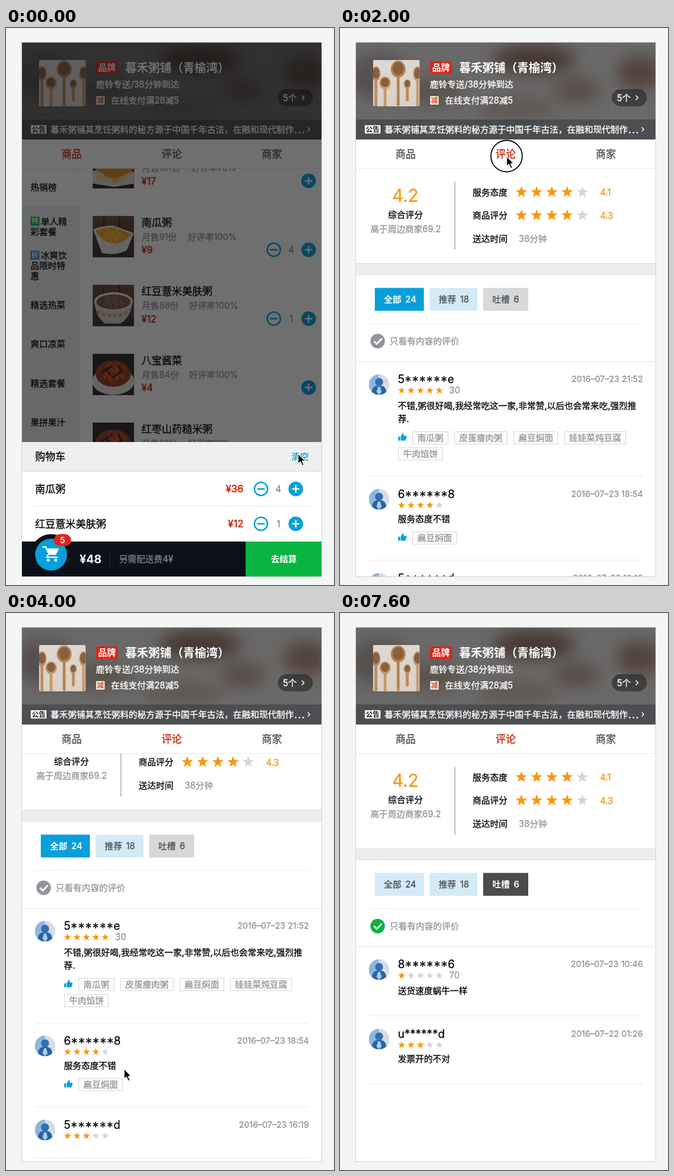
Write an HTML page that moves like this. It is 575 px wide and 974 px high and loops after 8000 ms.

```html
<!DOCTYPE html>
<html lang="zh-CN">
<head>
<meta charset="utf-8">
<title>Ordering page</title>
<style>
html, body { margin: 0; width: 100%; height: 100%; overflow: hidden; background: #f4f6f6; }
svg { display: block; width: 575px; height: 974px; }
text { font-family: Inter, "Noto Sans CJK SC", "Noto Sans CJK", sans-serif; white-space: pre; stroke-width: .35px; }
</style>
</head>
<body>
<svg id="stage" viewBox="0 0 575 974" xmlns="http://www.w3.org/2000/svg">
  <defs>
    <clipPath id="page"><rect x="28" y="25" width="525.5" height="934"/></clipPath>
    <clipPath id="body"><rect x="28" y="246" width="525.5" height="713"/></clipPath>
    <clipPath id="banner"><rect x="28" y="25" width="525.5" height="170"/></clipPath>
    <clipPath id="photo"><rect width="72.4" height="72.4"/></clipPath>
    <clipPath id="shop"><rect x="58" y="56" width="81.5" height="81" rx="2"/></clipPath>
    <clipPath id="face"><circle r="18"/></clipPath>
    <filter id="blur" x="-50%" y="-50%" width="200%" height="200%"><feGaussianBlur stdDeviation="14"/></filter>
    <linearGradient id="wood" x2="0" y2="1"><stop stop-color="#6b4a33"/><stop offset="1" stop-color="#33302f"/></linearGradient>
    <linearGradient id="wall" x2="0" y2="1"><stop stop-color="#dcd8d4"/><stop offset="1" stop-color="#dbd0c5"/></linearGradient>
  </defs>
  <rect width="575" height="974" fill="#f4f6f6"/>
  <rect x="28" y="25" width="525.5" height="934" fill="#fff"/>
  <g clip-path="url(#page)">
    <g id="view" clip-path="url(#body)"></g>
    <g id="head"></g>
    <g id="tabs"></g>
    <g id="cart"></g>
  </g>
  <rect x="27.5" y="25" width="526" height="934.5" fill="none" stroke="#cfd1d1"/>
  <g id="pointer"></g>
</svg>
<script>
const $ = id => document.getElementById(id);
const BLUE = '#079fdb', RED = '#c92a0e', GRAY = '#93979b', INK = '#080c12',
      LINE = '#e6e8e9', ORANGE = '#f9970f', PANEL = '#eceeee', GREEN = '#07b540';
const SIZE = 15.24, BIG = 17.8;

const text = (s, x, y, fill = INK, size = SIZE, anchor = 'start', weight = 400) =>
  `<text x="${x}" y="${y}" fill="${fill}" stroke="${weight > 500 ? 'none' : fill}" font-size="${size}" text-anchor="${anchor}" font-weight="${weight}">${s}</text>`;
const rect = (x, y, w, h, fill, more = '') =>
  `<rect x="${x}" y="${y}" width="${w}" height="${h}" fill="${fill}" ${more}/>`;
const disc = (x, y, r, fill, more = '') => `<circle cx="${x}" cy="${y}" r="${r}" fill="${fill}" ${more}/>`;
const oval = (x, y, rx, ry, fill, more = '') =>
  `<ellipse cx="${x}" cy="${y}" rx="${rx}" ry="${ry}" fill="${fill}" ${more}/>`;
const path = (d, fill, more = '') => `<path d="${d}" fill="${fill}" ${more}/>`;
const rule = (x1, x2, y, color = LINE) => path(`M${x1} ${y}H${x2}`, 'none', `stroke="${color}"`);
const at = (x, y, inner, more = '') => `<g transform="translate(${x} ${y})" ${more}>${inner}</g>`;

const plus = (x, y) => disc(x, y, 12.8, BLUE) +
  path(`M${x - 6.5} ${y}h13M${x} ${y - 6.5}v13`, 'none', 'stroke="#fff" stroke-width="2.5"');
const minus = (x, y) => disc(x, y, 11.5, 'none', `stroke="${BLUE}" stroke-width="2.6"`) +
  path(`M${x - 6.5} ${y}h13`, 'none', `stroke="${BLUE}" stroke-width="2.6"`);
const counter = (x, y, n) => minus(x, y) + text(n, x + 30.5, y + 5.5, '#85898d', SIZE, 'middle') + plus(x + 61, y);

// Header
function header() {
  const spoon = (x, y, rx, ry, len, color) =>
    path(`M${x} ${y}v${len}`, 'none', `stroke="${color}" stroke-width="5" stroke-linecap="round"`) +
    oval(x, y, rx, ry, color) + oval(x, y - 1, rx * .75, ry * .75, '#8a603c');
  const blobs = [[340, 55, 72, 26, '#473931'], [525, 78, 40, 30, '#53433a'], [415, 108, 40, 22, '#574b44'],
    [70, 85, 55, 40, '#55504d'], [165, 112, 55, 24, '#5a524d'], [310, 140, 70, 22, '#5f5954']];
  return `<g clip-path="url(#banner)">${rect(28, 25, 526, 170, '#6a6969')}
    <g filter="url(#blur)">${blobs.map(b => oval(...b)).join('')}</g></g>` +
    `<g clip-path="url(#shop)">${rect(58, 56, 82, 81, 'url(#wall)')}` +
    spoon(63, 80, 8, 13, 60, '#b98c63') + spoon(102, 72, 13, 15, 62, '#b58453') +
    spoon(79, 96, 10, 11, 45, '#c49869') + spoon(118, 98, 6, 8, 28, '#b98a5c') +
    spoon(136, 80, 8, 13, 60, '#c59c73') + '</g>' +
    rect(158, 58.5, 38, 22, '#d9261c', 'rx="1.5"') + text('品牌', 177, 75.2, '#fff', 15.5, 'middle', 700) +
    text('暮禾粥铺（青榆湾）', 209, 77, '#fff', 20.3, 'start', 700) +
    text('鹿铃专送/38分钟到达', 157.5, 104.2, '#fff') +
    rect(158, 119, 15, 15, '#f5e7df', 'rx="1"') + text('减', 165.5, 131, '#d4572c', 12, 'middle', 700) +
    text('在线支付满28减5', 184, 132, '#fff') +
    rect(476.5, 107, 61.5, 30, '#0f1013', 'rx="15" opacity=".45"') + text('5个', 485.5, 128, '#fff') +
    path('M518.5 118l4 4-4 4', 'none', 'stroke="#fff" stroke-width="1.6"') +
    rect(28, 160, 526, 35, '#07111b', 'opacity=".3"') +
    rect(43.5, 170, 27.5, 14.5, '#fff', 'rx="1"') + text('公告', 57.3, 181.8, '#222', 12, 'middle', 700) +
    text('暮禾粥铺其烹饪粥料的秘方源于中国千年古法，在融和现代制作', 78, 182.6, '#fff') +
    [508, 514.5, 521].map(x => disc(x, 183, 1.4, '#fff')).join('') +
    path('M529 173.5l3.5 3.8-3.5 3.8', 'none', 'stroke="#fff" stroke-width="1.5"');
}

const tabs = active => rect(28, 195, 526, 51, '#fff') + rule(28, 554, 245.5) +
  ['商品', '评论', '商家'].map((s, i) =>
    text(s, 115 + i * 175.5, 227.3, i === active ? RED : '#4d5257', BIG, 'middle')).join('');

// Goods
const crumbs = color => Array.from({ length: 14 }, (_, i) =>
  disc(36 + 19 * Math.sin(i * 2.4) * Math.sqrt(i / 14), 33 + 11 * Math.cos(i * 2.4) * Math.sqrt(i / 14), 3, color)).join('');
const wood = rect(0, 0, 73, 73, 'url(#wood)') +
  path('M20 0L14 73M46 0L52 73', 'none', 'stroke="#2b211c" stroke-width="1.5"');
const photos = {
  cake: rect(0, 0, 73, 73, '#292625') + path('M0 42L40 34 73 44V64L38 70 0 64Z', '#ddd5c6') +
    path('M4 38L44 26 73 38 40 62Z', '#d98c32') + path('M6 50L40 58 70 44', 'none', 'stroke="#f4c765" stroke-width="4"'),
  pumpkin: wood + path('M1 24Q10 18 36 17L72 30 60 60Q44 70 16 65Z', '#e6e5e6') +
    path('M5 26Q22 19 38 20L68 32Q58 46 40 49 16 46 5 26Z', '#f2a024') + at(-1, 1, crumbs('#f6b23c')),
  bean: wood + path('M3 30Q6 58 22 68H48Q66 58 70 30Z', '#d3cdc4') +
    path('M7 47Q36 62 66 45', 'none', 'stroke="#c39b4e" stroke-width="4" stroke-dasharray="6 4"') +
    oval(36.5, 29, 34, 16, '#e9e5e0') + oval(36.5, 30, 30, 13, '#7b5341') + at(0, -3, crumbs('#94695a')),
  stew: rect(0, 0, 73, 73, '#2b2827') + oval(36, 48, 37, 24, '#e6e4e3') +
    oval(36, 35, 31, 23, '#963a1f') + at(0, 4, crumbs('#cf5a2a')) + at(4, -8, crumbs('#b84a24')) +
    path('M14 34l20-13M34 42l17-11M22 26l9 12M45 20l6 13', 'none', 'stroke="#41251a" stroke-width="3.5"'),
  bread: rect(0, 0, 73, 73, '#4a4a49') + oval(38, 46, 46, 32, '#e8e6e3') +
    path('M3 45Q8 22 38 17L73 48 64 60 16 68Z', '#d5a87e') +
    path('M38 17L18 66M38 17L46 62M38 17L66 58', 'none', 'stroke="#b58055" stroke-width="1.5"')
};
const foods = [
  ['cake', '', '月售101份', '好评率78%', 17], ['pumpkin', '南瓜粥', '月售91份', '好评率100%', 9, 4],
  ['bean', '红豆薏米美肤粥', '月售86份', '好评率100%', 12, 1], ['stew', '八宝酱菜', '月售84份', '好评率100%', 4],
  ['stew', '红枣山药糙米粥', '月售81份', '好评率91%', 10], ['bread', '糊塌子', '月售80份', '好评率93%', 10]];

function goods({ cart, roll }) {
  let out = rect(28, 246, 526, 652, PANEL) + rect(129.5, 246, 424, 641, '#fff') + rect(28, 246, 101.5, 67, '#fff');
  const menu = ['热销榜', , , '精选热菜', '爽口凉菜', '精选套餐', '果拼果汁', '小吃主食', '特色粥品'];
  menu.forEach((s, i) => out += text(s, 43, 284 + i * 68.5));
  for (let i = 2; i < 10; i++) out += rule(43, 114, 244.5 + i * 68.5, '#e0e2e3');
  const badge = (s, y, color) => rect(43, y, 15.5, 15.5, color, 'rx="1"') + text(s, 50.7, y + 12.4, '#fff', 12.5, 'middle', 700);
  out += badge('特', 330, GREEN) + text('单人精', 61, 343.5) + text('彩套餐', 43, 361.5) +
    badge('折', 389.5, '#3089cf') + text('冰爽饮', 61, 403) + text('品限时特', 43, 421) + text('惠', 43, 439);
  foods.forEach(([pic, name, sold, rate, price, count], i) => {
    const y = 208 + i * 120.5;
    out += at(152, y, photos[pic], 'clip-path="url(#photo)"') +
      text(name, 237.5, y + 18.3, INK, BIG) + text(sold, 238, y + 42.2, GRAY) +
      text(rate, (sold.length > 5 ? 325 : i < 2 ? 318.5 : 321) - (i > 3 ? 2.5 : 0), y + 42.2, GRAY) +
      text('¥' + price, 237.5, y + 65.8, RED, 16.6, 'start', 500);
    if (i < 5) out += rule(152, 554, y + 97.5, '#e9ebec');
    out += cart && count ? counter(469.5, y + 59.2, count) : plus(530.5, y + 59.2);
    if (roll && count) out += at(503, y + 60, disc(0, 0, 11.5, 'none', 'stroke="#b9c3d2" stroke-width="2.4"') +
      path('M-2 6L2-6', 'none', 'stroke="#c3cbd6" stroke-width="2"'));
  });
  return out;
}

function cartBar({ cart }) {
  const tint = cart ? '#fff' : '#8b8e92';
  const trolley = at(64.5, 905.5, path('M0 2h5l6 12.5h11l5-9.500M9.500 15L7 20h19', 'none',
      `stroke="${tint}" stroke-width="2.600"`) +
    path('M6 4.500h22l-5.500 11H11Z', tint) + disc(9.5, 25, 2.6, tint) + disc(22.5, 25, 2.6, tint));
  const x = cart ? 182 : 169.5;
  let out = '';
  if (cart) {
    out += rect(28, 25, 526, 873, '#0b0b0c', 'opacity=".59"') + rect(28, 724, 526, 51, '#eeefef') +
      rect(28, 775, 526, 123, '#fff') + rule(28, 554, 775.5, '#d9dcde') +
      text('购物车', 51, 756, INK, BIG) + text('清空', 500.5, 754.5, BLUE);
    [['南瓜粥', 36, 4], ['红豆薏米美肤粥', 12, 1]].forEach(([name, sum, n], i) => {
      const y = 806 + i * 61;
      out += text(name, 51, y + 6.8, INK, BIG) + text('¥' + sum, 416.5, y + 6.3, RED, 17.3, 'end', 500) + counter(447, y, n);
    });
    out += rule(51, 531, 836.5);
  }
  out += disc(79, 921, 36, '#0b1019') + rect(28, 898, 392, 61, '#0b1019') +
    rect(420, 898, 134, 61, cart ? GREEN : '#2b2f34') + disc(79, 921, 28, cart ? BLUE : '#2b2f34') + trolley +
    text(cart ? '¥48' : '¥0', 129, 936, cart ? '#fff' : '#777b80', 20.3, 'start', 700) +
    path(`M${x} 913v31`, 'none', 'stroke="#2d3238"') + text('另需配送费4¥', x + 16.3, 933.5, '#777b80', SIZE, 'start', 500) +
    text(cart ? '去结算' : '¥20元起送', 487, 934, cart ? '#fff' : '#85898d', SIZE, 'middle', 700);
  if (cart) out += rect(84, 885, 30, 21, '#e0261a', 'rx="10.5"') + text('5', 99, 900.8, '#fff', 15, 'middle', 600);
  return out;
}

// Ratings
const star = (x, y, r, on) => {
  const points = Array.from({ length: 10 }, (_, i) => {
    const a = i * Math.PI / 5, k = i % 2 ? r * .42 : r;
    return (x + k * Math.sin(a)).toFixed(2) + ',' + (y - k * Math.cos(a)).toFixed(2);
  });
  return `<polygon points="${points.join(' ')}" fill="${on ? ORANGE : '#d3d5d7'}"/>`;
};
const stars = (x, y, r, gap, n) => [0, 1, 2, 3, 4].map(i => star(x + i * gap, y, r, i < n)).join('');
const avatar = at(68.5, 9.5, rect(-18, -18, 18, 36, '#8db6df') + rect(0, -18, 18, 36, '#d6dde4') +
  path('M-13 18Q-13 3-4 2H4Q13 3 13 18Z', '#2a63a6') + disc(0, -4.5, 7, '#2f6fb4') +
  path('M-2 4h4l2.5 9L0 18-4.5 13Z', '#a9cbec'), 'clip-path="url(#face)"');
const thumb = path('M0 6h3.4v7H0ZM4.5 6L8 0Q10.5 0 9.6 4.8H14Q15.2 6 14.5 8L12.5 13H4.5Z', BLUE);

const reviews = [
  { id: '5******e', date: '07–23 21:52', n: 5, min: 30, good: 1,
    lines: ['不错,粥很好喝,我经常吃这一家,非常赞,以后也会常来吃,强烈推', '荐.'],
    tags: ['南瓜粥', '皮蛋瘦肉粥', '扁豆焖面', '娃娃菜炖豆腐', '牛肉馅饼'] },
  { id: '6******8', date: '07–23 18:54', n: 4, good: 1, lines: ['服务态度不错'], tags: ['扁豆焖面'] },
  { id: '5******d', date: '07–23 16:19', n: 3 },
  { id: '7******e', date: '07–23 16:17', n: 5, min: 20, good: 1, lines: ['良心店铺'] },
  { id: '6******p', date: '07–23 13:21', n: 4, min: 10, good: 1 },
  { id: '8******6', date: '07–23 10:46', n: 1, min: 70, lines: ['送货速度蜗牛一样'] },
  { id: '5******9', date: '07–23 02:26', n: 3 },
  { id: 'f******d', date: '07–22 18:06', n: 3 },
  { id: 'u******d', date: '07–22 01:26', n: 3, lines: ['发票开的不对'] }];

function review({ id, date, n, min, lines = [], tags = [] }, top) {
  const shift = min ? 2.5 : 0;
  let y = 58 + shift;
  let out = avatar + text(id, 101.5, 7, INK, 19.5) + text('2016–' + date, 531, 5, GRAY, 14.8, 'end') +
    stars(108, 20, 6.6, 16.5, n) + (min ? text(min, 191.5, 25.3, GRAY) : '');
  lines.forEach((s, i) => out += text(s, 101.5, 49.3 + shift + i * 23));
  if (lines.length) y += 30 + (lines.length - 1) * 23;
  if (tags.length) {
    let x = 127, mid = y - 11;
    out += at(102, mid - 8, thumb);
    tags.forEach(s => {
      const w = s.length * SIZE + 17;
      if (x + w > 531) { x = 102; mid += 28; y += 28; }
      out += rect(x + .5, mid - 10.5, w - 1, 21.5, '#fff', 'stroke="#d6d9dc" stroke-width="1.2"') + text(s, x + 8.5, mid + 5.5, GRAY);
      x += w + 10.7;
    });
    y += 28;
  }
  return [at(0, top, out + rule(51, 531, y)), top + y + 31];
}

function ratings({ scroll, tab, only }) {
  let out = text('4.2', 114.5, 304, ORANGE, 30.5, 'middle') + text('综合评分', 114.8, 332.3, INK, SIZE, 'middle') +
    text('高于周边商家69.2', 115, 356.5, GRAY, SIZE, 'middle') + path('M201.5 269V388', 'none', 'stroke="#84878a"');
  [['服务态度', '4.1'], ['商品评分', '4.3']].forEach(([s, score], i) => {
    const y = 287 + i * 40.7;
    out += text(s, 232.5, y + 5.7) + stars(318, y, 10.5, 26.7, 4) + text(score, 456, y + 6, ORANGE);
  });
  out += text('送达时间', 232.5, 374.3) + text('38分钟', 313.5, 374.3, GRAY) +
    rect(28, 411, 526, 20.5, PANEL) + rule(28, 554, 411.5, '#dcdfe0') + rule(28, 554, 431.5, '#dcdfe0');
  [['全部', 24, 61, 86, BLUE, '#d4eaf7'], ['推荐', 18, 157, 84, BLUE, '#d4eaf7'], ['吐槽', 6, 251, 79, '#4a4b4d', '#d7d8d9']]
    .forEach(([s, n, x, w, on, off], i) => {
      const look = i === tab ? ['#fff', SIZE, 'start', 600] : ['#4d5257'];
      out += rect(x, 454.5, w, 40, i === tab ? on : off, 'rx="1"') +
        text(s, x + 16, 479.7, ...look) + text(n, x + 53.5, 479.5, ...look);
    });
  out += rule(51, 531, 517) + disc(66, 547.5, 12.7, only ? GREEN : '#919499') +
    path('M59.5 547.5l5 5 9-9.5', 'none', 'stroke="#fff" stroke-width="2.8"') +
    text('只看有内容的评价', 87, 553.2, GRAY) + rule(28, 554, 583.5, '#e1e4e5');
  let top = 614;
  reviews.filter(r => (!tab || (tab === 1) === !!r.good) && (!only || r.lines)).forEach(r => {
    const [item, next] = review(r, top);
    out += item;
    top = next;
  });
  return at(0, -scroll, out);
}

const arrow = path('M0 0V18L4.2 14.2 7.2 21.5 10.3 20.2 7.3 13.2H12.8Z', '#000',
  'stroke="#fff" stroke-width="1.4" stroke-linejoin="round"');
const pointer = ({ x, y, ring, hide }) => hide ? '' : at(x, y,
  (ring ? disc(0, 0, 27.5, 'none', 'stroke="#000" stroke-width="1.8"') : '') + arrow);

// Each step keeps the last one's values; ring and roll hold for one step only.
const STEP = 400;
const steps = [
  { x: 512, y: 744, view: 0, cart: 1, scroll: 0, tab: 0, only: 0 },
  { ring: 1 },
  { cart: 0, roll: 1 },
  { x: 440, y: 520 },
  { x: 292, y: 224 },
  { view: 1, ring: 1 },
  { x: 252, y: 690 },
  { x: 246.5, y: 316, scroll: 390, ring: 1 },
  { scroll: 406 },
  { x: 226, y: 420, scroll: 364, ring: 1 },
  { x: 207, y: 797, scroll: 67 },
  { y: 780, scroll: -20 },
  { x: 197, y: 467, scroll: 0 },
  { tab: 1, ring: 1 },
  { x: 290, y: 490 },
  { tab: 2 },
  { x: 70, y: 547 },
  { only: 1 },
  { x: 350, y: 713 },
  { hide: 1 }
];
const states = [];
steps.forEach((s, i) => states.push({ ...states[i - 1], ring: 0, roll: 0, ...s }));

let shown = -1;
function frame(now) {
  const step = Math.floor(now / STEP) % steps.length;
  if (step !== shown) {
    shown = step;
    const s = states[step];
    $('view').innerHTML = s.view ? ratings(s) : goods(s);
    $('tabs').innerHTML = tabs(s.view);
    $('cart').innerHTML = s.view ? '' : cartBar(s);
    $('pointer').innerHTML = pointer(s);
  }
  requestAnimationFrame(frame);
}
$('head').innerHTML = header();
frame(performance.now());
</script>
</body>
</html>
```
